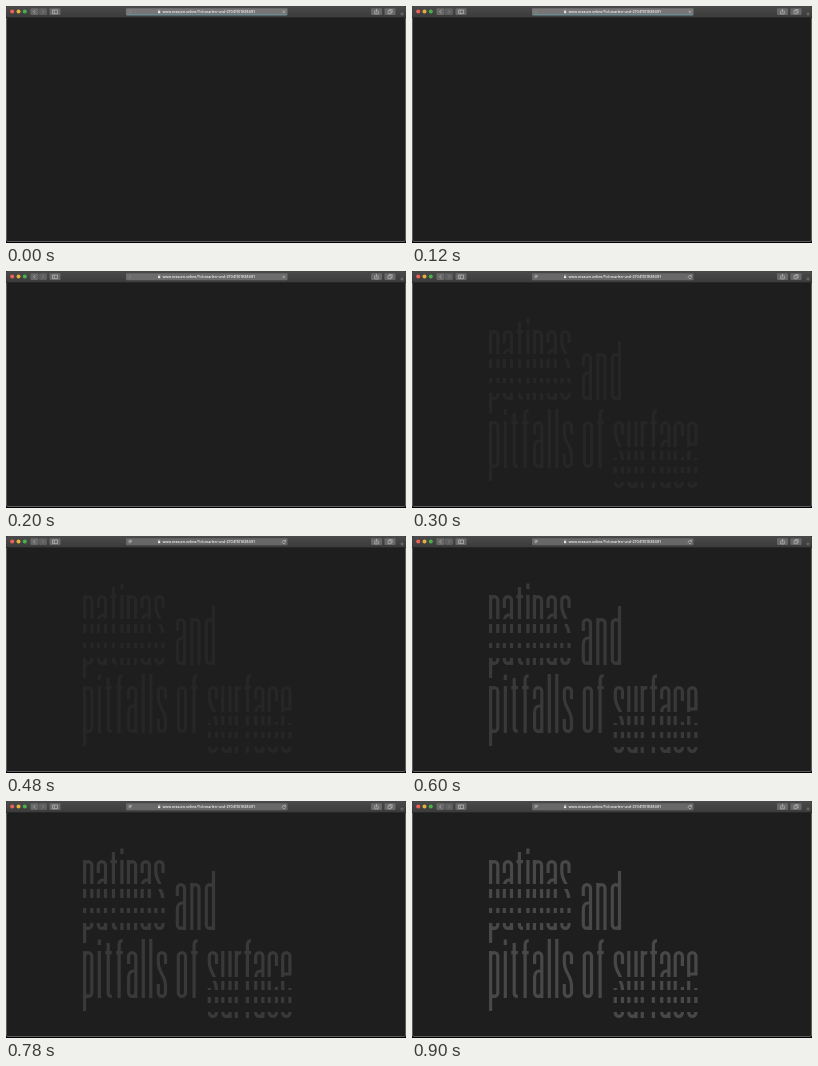
These frames come from a looping animation (400 by 237 pixels, 1000 ms). An HTML page:

```html
<!DOCTYPE html>
<html lang="en">
<head>
<meta charset="utf-8">
<title>patinas and pitfalls of surface</title>
<style>
  html, body { margin: 0; width: 100%; height: 100%; overflow: hidden; background: #000; }
  svg { display: block; width: 100%; height: 100%; }
  .url { font: 600 3.5px Inter, Arial, sans-serif; fill: #ececec; text-anchor: middle; }
  .btn { fill: #686868; }
  .icon { fill: none; stroke: #c4c4c4; stroke-width: .6; }
  #field { animation: field 1s step-end infinite; }
  #progress { animation: loading 1s step-end infinite; }
  #stop { animation: pending 1s step-end infinite; }
  #ready { animation: ready 1s step-end infinite; }
  #title { fill: none; stroke-width: 3.2; animation: reveal 1s step-end infinite; }
  @keyframes field {
    0% { fill: #767676; }
    20% { fill: #6c6c6c; }
    30%, 100% { fill: #686868; }
  }
  @keyframes loading {
    0% { opacity: 1; }
    20%, 100% { opacity: 0; }
  }
  @keyframes pending {
    0% { opacity: 1; }
    30%, 100% { opacity: 0; }
  }
  @keyframes ready {
    0% { opacity: 0; }
    30%, 100% { opacity: 1; }
  }
  @keyframes reveal {
    0% { stroke: transparent; }
    30% { stroke: #262626; }
    60% { stroke: #393939; }
    90%, 100% { stroke: #484848; }
  }
</style>
</head>
<body>
<svg viewBox="0 0 400 237" preserveAspectRatio="none">
  <defs>
    <linearGradient id="bar" x2="0" y2="1">
      <stop stop-color="#4a4a4a"/>
      <stop offset="1" stop-color="#3a3a3a"/>
    </linearGradient>
  </defs>
  <rect width="400" height="237" fill="#000"/>
  <rect width="400" height="236" rx="2" fill="#5c5c5c"/>
  <rect x="1" y="12" width="398" height="223" rx="1" fill="#1e1e1e"/>
  <path d="M0 12V2q0-2 2-2H398q2 0 2 2V12Z" fill="url(#bar)"/>
  <path d="M0 11.7H400" stroke="#1a1a1a" stroke-width=".7"/>

  <circle cx="6.2" cy="5.6" r="2" fill="#ee6058"/>
  <circle cx="12.5" cy="5.6" r="2" fill="#e2b23c"/>
  <circle cx="18.8" cy="5.6" r="2" fill="#4bb04a"/>

  <g class="btn">
    <rect x="24.5" y="2.3" width="8" height="6.8" rx="1"/>
    <rect x="33" y="2.3" width="8" height="6.8" rx="1" opacity=".75"/>
    <rect x="43.5" y="2.3" width="11" height="6.8" rx="1"/>
    <rect x="365" y="2.3" width="11" height="6.8" rx="1"/>
    <rect x="378.5" y="2.3" width="11" height="6.8" rx="1"/>
  </g>
  <g class="icon">
    <path d="M29.2 4l-1.6 1.7 1.6 1.7M46.5 4h5v3.6h-5zM48.3 4v3.6"/>
    <path d="M36.3 4l1.6 1.7-1.6 1.7" opacity=".5"/>
    <path d="M369.4 4.9h-.7v3h3.6v-3h-.7M370.5 6.4V3.3M369.6 4.2l.9-.9.9.9"/>
    <path d="M382.1 4.7h3v3h-3zM383.2 4.7v-1.1h3v3h-1.1"/>
    <path d="M394.3 8h3.4M396 6.3v3.4" opacity=".5"/>
  </g>

  <rect id="field" x="120" y="2.3" width="161.5" height="7" rx="1"/>
  <path id="progress" d="M120.5 8.9H281" stroke="#6aa3ab" stroke-width=".8"/>
  <g id="stop" class="icon">
    <path d="M122.8 4.9h2.6M122.8 6.6h2.6" opacity=".3"/>
    <path d="M276.6 4.6l2.4 2.4M279 4.6l-2.4 2.4"/>
  </g>
  <g id="ready" class="icon">
    <path d="M122.6 4.3h3.4M122.6 5.5h3.4M122.6 6.7h2.2"/>
    <path d="M279.2 5.2a1.6 1.6 0 1 0 .2 1.2M279.5 3.8v1.5h-1.5"/>
  </g>
  <rect x="152" y="5.2" width="2.2" height="1.9" fill="#eee"/>
  <path class="icon" d="M152.4 5.3V4.6a.7.7 0 0 1 1.4 0v.7"/>
  <text class="url" x="202.5" y="7.1">www.erasure.online/?id=marlen-und-27041101938491</text>

  <g id="title" role="img" aria-label="patinas and pitfalls of surface"></g>
</svg>
<script>
const NS = 'http://www.w3.org/2000/svg';
const title = document.getElementById('title');

// Half-circle joins between the stems: R = left to right, L = right to left.
const arc = (sweep, dx) => `a3.6 3.6 0 0 ${sweep} ${dx} 0`;
const overR = arc(1, 7.2), overL = arc(0, -7.2);
const underR = arc(0, 7.2), underL = arc(1, -7.2);

// Condensed letter skeletons on a baseline at 0: [width, path].
const glyphs = {
  a: [10.4, `M1.6-34V-41.8${overR}V0M8.8-27H6.5C3-27 1.6-24 1.6-20V-5.2${underR}`],
  d: [10.4, `M8.8-59V0M8.8-41.8${overL}V-5.2${underR}`],
  c: [10.4, `M8.8-32V-41.8${overL}V-5.2${underR}V-15`],
  e: [10.4, `M1.6-24H8.8V-41.8${overL}V-5.2${underR}V-14`],
  f: [6.6, 'M3 0V-53Q3-57.4 6.6-57.4M0-45.4H6.6'],
  i: [3.2, 'M1.6-47V0M1.6-58.5V-53'],
  l: [3.2, 'M1.6-59V0'],
  n: [10.4, `M1.6-47V0M1.6-41.8${overR}V0`],
  o: [10.4, `M1.6-41.8${overR}V-5.2${underL}Z`],
  p: [10.4, `M1.6-47V13M1.6-41.8${overR}V-5.2${underL}`],
  r: [6.6, 'M1.6-47V0M1.6-40C1.6-44 3-45.4 6.6-45.4'],
  s: [10.4, `M8.8-34V-41.8${overL}V-36C1.6-25 8.8-23 8.8-12V-5.2${underL}V-14`],
  t: [6.6, 'M3-55V-5Q3-1.6 6.6-1.6M0-45.4H6.6'],
  u: [10.4, `M1.6-47V-5.2${underR}M8.8-47V0`]
};

function add(parent, tag, attrs) {
  const el = document.createElementNS(NS, tag);
  for (const key in attrs) el.setAttribute(key, attrs[key]);
  return parent.appendChild(el);
}

function word(parent, text, x, y, gap) {
  for (const ch of text) {
    const [width, d] = glyphs[ch];
    add(parent, 'path', { d, transform: `translate(${x} ${y})` });
    x += width + gap;
  }
}

// Cuts a word into horizontal bands [top, bottom, shift] and spreads them.
function sliced(text, x, y, gap, bands) {
  for (const [top, bottom, shift] of bands) {
    const id = `${text}${top}`;
    const clip = add(title, 'clipPath', { id });
    add(clip, 'rect', { x: x - 2, y: top, width: 100, height: bottom - top });
    const g = add(title, 'g', { transform: `translate(0 ${shift})`, 'clip-path': `url(#${id})` });
    word(g, text, x, y, gap);
  }
}

sliced('patinas', 77, 129, 3.3, [[68, 106, -23], [106, 115, -18], [115, 120, -8], [122, 145, 0]]);
word(title, 'and', 169.7, 129, 4.1);
word(title, 'pitfalls', 77, 197, 4.3);
word(title, 'of', 170.7, 197, 4);
sliced('surface', 201.7, 197, 3.1, [[136, 176, 0], [176, 185, 4], [185, 191, 11], [191, 198, 20]]);
</script>
</body>
</html>
```
